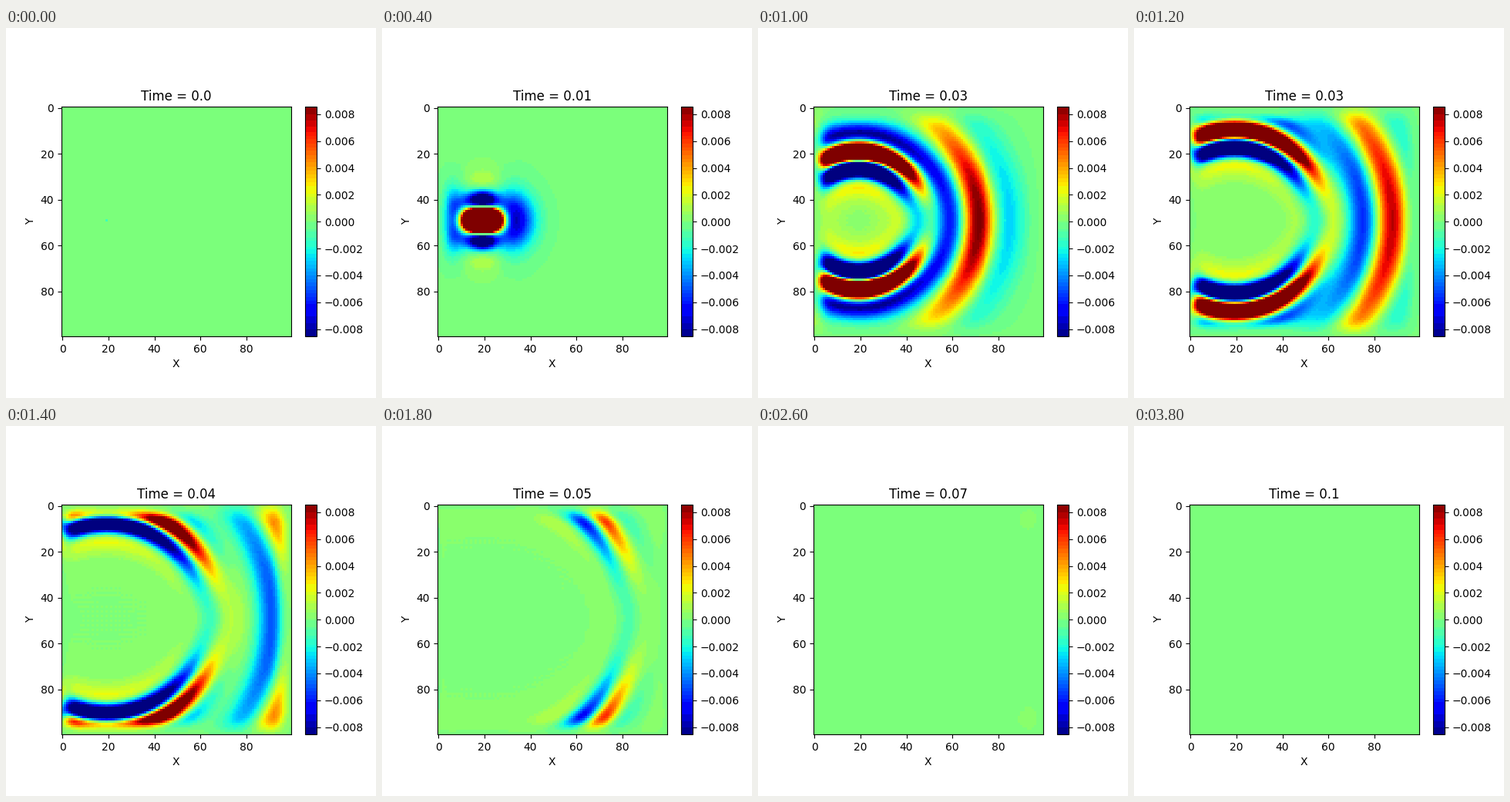
Recreate the animation shown at these times as a matplotlib script. Size 480 by 480 pixels, loop 4 s.

```python
import numpy as np
import matplotlib.pyplot as plt
from matplotlib.animation import FuncAnimation
from matplotlib.colors import ListedColormap

SIZE = 480
N = 100                      # grid cells per side
VP = 3300.0                  # P speed, cells per second
VS = VP / np.sqrt(3)         # S speed
FREQ, DELAY = 90.0, 0.01     # Ricker wavelet
FORCE = 2500.0
SOURCE = (49, 19)            # row, column
DT = 0.1 / 999
STRIDE, FRAMES = 50, 20
PML_WIDTH, PML_RATE = 10, 2500.0
VMAX = 0.00854


def ricker(t):
    s = (np.pi * FREQ * (t - DELAY)) ** 2
    return (1 - 2 * s) * np.exp(-s)


def forward(f, axis):
    return np.diff(f, axis=axis, append=0)


def backward(f, axis):
    return np.diff(f, axis=axis, prepend=0)


def edge_drag(offset):
    """Damping per half step for nodes shifted by a fraction of a cell."""
    pos = np.arange(N) + offset
    depth = np.maximum(PML_WIDTH - pos, pos - (N - 1 - PML_WIDTH))
    return PML_RATE * (np.maximum(depth, 0) / PML_WIDTH) ** 2 * DT / 2


def simulate():
    """Horizontal velocity of an elastic wave with split-field absorbing edges."""
    # Each field is a pair: the part driven along y and the part along x.
    vx, vy, txx, tyy, txy = np.zeros((5, 2, N, N))
    whole, half = edge_drag(0), edge_drag(0.5)
    stiff, shear = VP ** 2, VS ** 2
    lam = stiff - 2 * shear

    def advance(field, drag_y, drag_x, along_y, along_x):
        parts = (drag_y[:, None], along_y), (drag_x[None, :], along_x)
        for k, (d, rate) in enumerate(parts):
            field[k] = (field[k] * (1 - d) + DT * rate) / (1 + d)

    snapshots = []
    for step in range(STRIDE * (FRAMES - 1) + 1):
        sx, sy, sxy = txx.sum(0), tyy.sum(0), txy.sum(0)
        advance(vx, whole, whole, backward(sxy, 0), backward(sx, 1))
        advance(vy, half, half, forward(sy, 0), forward(sxy, 1))
        vx[1][SOURCE] += DT * FORCE * ricker(step * DT)

        u, w = vx.sum(0), vy.sum(0)
        ux, wy = forward(u, 1), backward(w, 0)
        advance(txx, whole, half, lam * wy, stiff * ux)
        advance(tyy, whole, half, stiff * wy, lam * ux)
        advance(txy, half, whole, shear * forward(u, 0), shear * backward(w, 1))
        if step % STRIDE == 0:
            snapshots.append(u)
    return snapshots


def banded_jet():
    """Jet with neighbouring shades merged into flat bands."""
    colors = plt.get_cmap("jet")(np.arange(256))[:, :3]
    keys = (colors * 255).astype(int) // [32, 16, 32]
    merged = [colors[(keys == key).all(axis=1)].mean(axis=0) for key in keys]
    return ListedColormap(merged)


def add_axes(left, bottom, width, height):
    return fig.add_axes([v / SIZE for v in (left, bottom, width, height)])


snapshots = simulate()

fig = plt.figure(figsize=(SIZE / 100, SIZE / 100), dpi=100)
ax = add_axes(72, 80, 297.6, 297.6)
cax = add_axes(388.2, 80, 14.88, 297.6)
image = ax.imshow(snapshots[0], cmap=banded_jet(), vmin=-VMAX, vmax=VMAX,
                  interpolation="nearest")
fig.colorbar(image, cax=cax)
ax.set_xlabel("X")
ax.set_ylabel("Y")
title = ax.set_title("Time = 0.0")


def update(frame):
    image.set_data(snapshots[frame])
    title.set_text(f"Time = {round(frame * STRIDE * DT, 2)}")
    return image, title


anim = FuncAnimation(fig, update, frames=FRAMES, interval=200, repeat=True)
plt.show()
```
